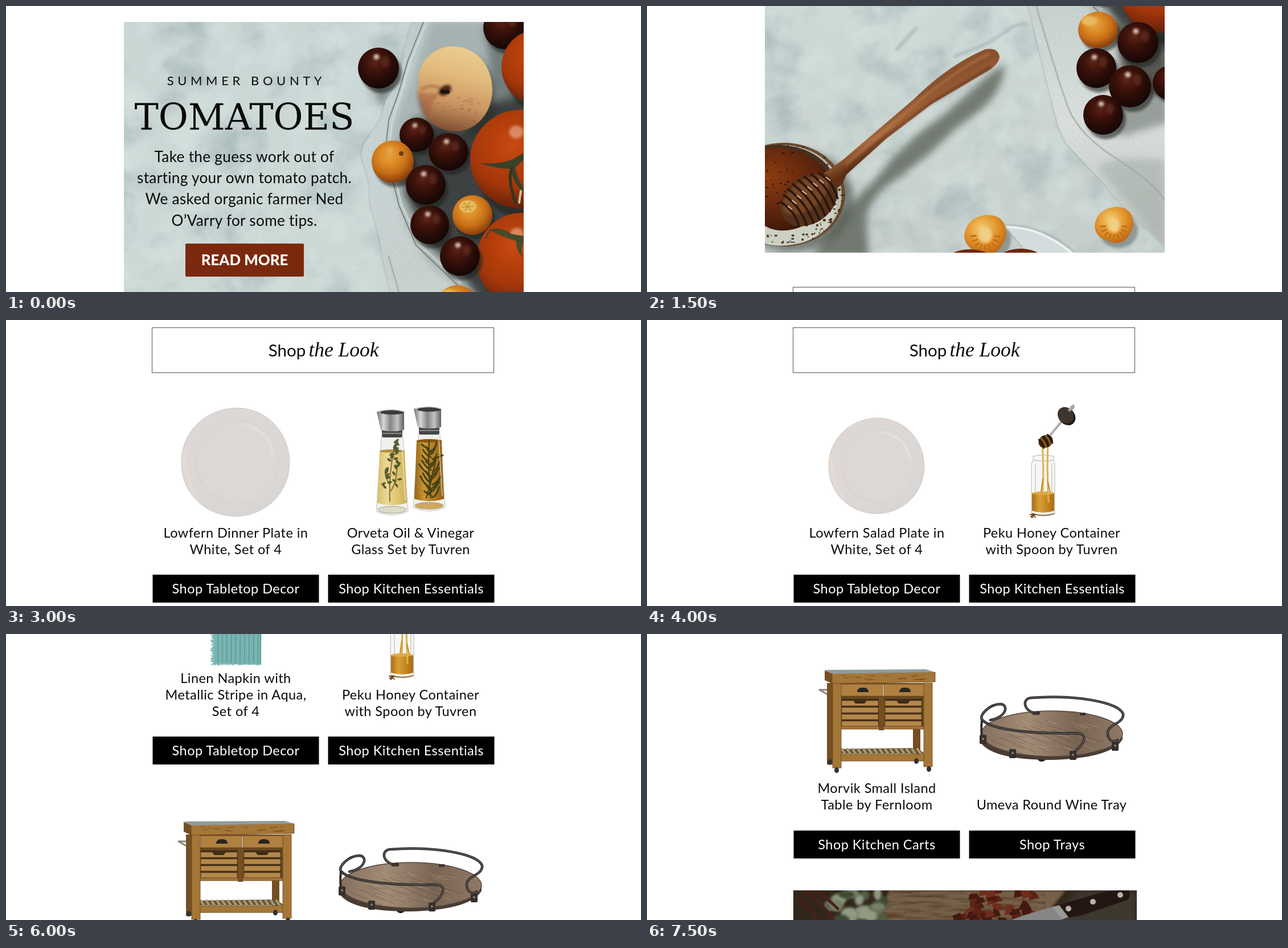
An HTML page that plays this animation: 1115x502 px, repeating every 8000 ms.

```html
<!DOCTYPE html>
<html lang="en">
<head>
<meta charset="utf-8">
<title>Summer Bounty</title>
<style>
  html, body { margin: 0; width: 100%; height: 100%; overflow: hidden; background: #fff; }
  svg { display: block; width: 100%; height: 100%; }
  text { font-family: Lato, sans-serif; text-anchor: middle; fill: #0b0b0b; }
  .label { font-size: 23.5px; letter-spacing: .45px; }
  .light { fill: #fff; }
  .body { font-size: 26.2px; letter-spacing: .3px; }
  .line { fill: none; stroke-linecap: round; stroke-linejoin: round; }
</style>
</head>
<body>
<svg id="stage" viewBox="0 0 1115 502"></svg>
<script>
const STEP = 500, STEPS = 16;

let seed = 7;
const rnd = (lo, hi) => {
  seed = (seed * 16807) % 2147483647;
  return lo + (hi - lo) * seed / 2147483647;
};
const times = (n, draw) => Array.from({ length: n }, (_, i) => draw(i)).join('');

const path = (d, fill, extra = '') => `<path d="${d}" fill="${fill}" ${extra}/>`;
const line = (d, color, width = 1, extra = '') =>
  `<path class="line" d="${d}" stroke="${color}" stroke-width="${width}" ${extra}/>`;
const oval = (x, y, rx, ry, fill, extra = '') =>
  `<ellipse cx="${x}" cy="${y}" rx="${rx}" ry="${ry}" fill="${fill}" ${extra}/>`;
const rect = (x, y, w, h, fill, extra = '') =>
  `<rect x="${x}" y="${y}" width="${w}" height="${h}" fill="${fill}" ${extra}/>`;
const text = (x, y, words, cls, extra = '') =>
  `<text x="${x}" y="${y}" class="${cls}" ${extra}>${words}</text>`;
const lines = (x, y, gap, cls, list) =>
  list.map((words, i) => text(x, y + i * gap, words, cls)).join('');
const at = (y, art) => `<g transform="translate(0 ${y})">${art}</g>`;
const turn = (deg, x, y) => `transform="rotate(${deg} ${x} ${y})"`;
const SOFT = 'filter="url(#soft)"', BLUR = 'filter="url(#blur)"';

const gradient = (id, stops, geometry) => {
  const tag = geometry ? 'linearGradient' : 'radialGradient';
  const box = geometry || 'cx=".42" cy=".35" r=".65"';
  return `<${tag} id="${id}" ${box}>` + stops.map((color, i) =>
    `<stop offset="${i / (stops.length - 1)}" stop-color="${color}"/>`).join('') + `</${tag}>`;
};
const DOWN = 'x1="0" y1="0" x2="0" y2="1"', ACROSS = 'x1="0" y1="0" x2="1" y2="0"';
const noise = (id, freq, rgb, gain, bias) => `
  <filter id="${id}" x="0" y="0" width="1" height="1" color-interpolation-filters="sRGB">
    <feTurbulence type="fractalNoise" baseFrequency="${freq}" numOctaves="5" seed="4"/>
    <feColorMatrix values="0 0 0 0 ${rgb[0]} 0 0 0 0 ${rgb[1]} 0 0 0 0 ${rgb[2]} ${gain} 0 0 0 ${bias}"/>
    <feComposite in2="SourceGraphic" operator="in"/>
  </filter>`;

const CLOTH = 'M712 28L700 76L690 130L667 166L657 200L628 243L624 262L637 308L640 350L654 400L667 470' +
  'L682 530L702 612L722 690L735 720L765 752L800 789L830 825L870 865L909 902V28Z';

const defs = `<defs>
  ${gradient('marble', ['#c9d6d4', '#cbd8d6', '#cdd9d6', '#cad5d2', '#c4cecb'], DOWN)}
  ${gradient('linen', ['#c2d0d1', '#ced9d9', '#ccd6d4', '#e0e5e2', '#c3c9c4'], DOWN)}
  ${gradient('dark', ['#5c2417', '#40130b', '#290c07', '#150706'])}
  ${gradient('red', ['#c84a12', '#b63f0b', '#a3370b', '#64200a'])}
  ${gradient('gold', ['#e2a23e', '#dd8c27', '#c56d17', '#8a3d0b'])}
  ${gradient('peach', ['#ebcd91', '#e2ba7c', '#cb9663', '#7d4c31'], 'x1=".6" y1="0" x2=".4" y2="1"')}
  ${gradient('pulp', ['#f3cf7b', '#e9ad48', '#dd8b24', '#bd6916'])}
  ${gradient('amber', ['#8c3d12', '#682a0e', '#401909'])}
  ${gradient('handle', ['#8a512d', '#a5673b', '#5e2f15'], 'x1=".42" y1=".4" x2=".56" y2=".62"')}
  ${gradient('steel', ['#6e6e6c', '#d8d8d6', '#858583', '#c4c4c2', '#5f5f5d'], ACROSS)}
  ${gradient('oil', ['#d8be6b', '#ead995', '#dfc670', '#cbae57'], ACROSS)}
  ${gradient('vinegar', ['#94641a', '#ca9634', '#b37c1f', '#8e5c12'], ACROSS)}
  ${gradient('honey', ['#a96d14', '#d89f38', '#c48522', '#ab6c12'], ACROSS)}
  ${gradient('china', ['#dcd6d5', '#ddd8d6', '#ddd8d5', '#d8d6d4'])}
  ${gradient('plank', ['#85705f', '#a28b76', '#796553', '#907966'], ACROSS)}
  <filter id="blur" x="-50%" y="-50%" width="200%" height="200%"><feGaussianBlur stdDeviation="2"/></filter>
  <filter id="soft" x="-50%" y="-50%" width="200%" height="200%"><feGaussianBlur stdDeviation="7"/></filter>
  ${noise('veins', '.011 .014', [.6, .67, .68], 1.6, -.78)}
  ${noise('clouds', '.02', [.86, .91, .9], 1.2, -.5)}
  ${noise('weave', '.5 .8', [.5, .56, .56], .7, -.28)}
  ${noise('grain', '.02 .16', [.25, .14, .05], 1.4, -.6)}
  <clipPath id="hero"><path d="M207 28H909V913H207Z"/></clipPath>
  <clipPath id="cloth"><path d="${CLOTH}"/></clipPath>
  <clipPath id="board"><path d="M257 1943H860V2020H257Z"/></clipPath>
</defs>`;

function fruit(kind, x, y, rx, ry = rx) {
  const shine = kind === 'red' ? .4 : kind === 'dark' ? .8 : .2;
  return oval(x + rx * .14, y + ry * .22, rx, ry, '#1d211c', `opacity=".6" ${BLUR}`) +
    oval(x, y, rx, ry, `url(#${kind})`) +
    oval(x - rx * .1, y - ry * .55, rx * .14, ry * .13, '#fff0e2', `opacity="${shine}" ${BLUR}`) +
    (kind === 'dark' ? oval(x + rx * .35, y - ry * .3, rx * .2, ry * .28, '#93523f', `opacity=".3" ${BLUR}`) : '');
}

function slice(x, y, r) {
  return oval(x + 8, y + 9, r, r * .9, '#59615a', `opacity=".5" ${BLUR}`) +
    path(`M${x - r} ${y}Q${x - r * .9} ${y - r * .8} ${x} ${y - r * .95}Q${x + r} ${y - r} ${x + r} ${y}` +
      `Q${x + r * .7} ${y + r} ${x} ${y + r * .9}Q${x - r} ${y + r * .7} ${x - r} ${y}Z`, 'url(#pulp)') +
    oval(x, y, r * .3, r * .36, '#f0cf85', BLUR) +
    times(9, i => {
      const a = .1 + i * .37, c = Math.cos(a), s = Math.sin(a);
      return line(`M${x + c * r * .45} ${y + s * r * .5}L${x + c * r * .68} ${y + s * r * .7}`, '#c27019', 3);
    });
}

function peach() {
  return oval(796, 160, 66, 74, '#1d211c', `opacity=".6" ${SOFT}`) +
    path('M724 135C720 105 748 70 785 71C828 71 855 108 854 150C852 190 825 220 788 220C750 218 732 195 733 172C722 160 721 150 724 135Z', 'url(#peach)') +
    path('M724 150Q740 158 765 150Q742 170 742 205Q720 180 724 150Z', '#99573a', `opacity=".45" ${BLUR}`) +
    line('M730 146Q750 134 767 148', '#8f5533', 4, `opacity=".6" ${BLUR}`) +
    times(50, () => oval(rnd(735, 830), rnd(160, 210), rnd(1, 4), rnd(1, 2.5), '#a8623f', 'opacity=".3"')) +
    oval(771, 148, 12, 8, '#4a2814', `${turn(-35, 771, 148)} ${BLUR}`) + line('M766 150L776 151', '#1b110b', 6);
}

function tomatoes() {
  return fruit('dark', 654, 109, 36) + fruit('dark', 876, 38, 38) + fruit('red', 932, 107, 62, 65) + peach() +
    fruit('dark', 721, 226, 30) + fruit('dark', 777, 256, 35, 33) + fruit('red', 905, 269, 90, 87) +
    fruit('gold', 679, 273, 37) + oval(694, 259, 4, 4, '#6b3b10') +
    fruit('dark', 737, 314, 35) + fruit('dark', 744, 384, 34) +
    fruit('gold', 819, 367, 35) + oval(811, 352, 15, 11, '#e5ba5f') +
    times(6, i => line(`M811 352l${11 * Math.cos(i)} ${8 * Math.sin(i)}`, '#c98b34', 1.5)) +
    fruit('red', 905, 445, 79, 82) + fruit('dark', 797, 439, 35) +
    path('M832 276Q867 278 888 270L909 258V270L894 284Q900 310 909 318V326Q888 310 887 286Q862 286 832 276Z', '#3b4029') +
    line('M888 285Q880 305 895 345', '#30371f', 5) + line('M904 325l-3 20', '#c8c4a3', 4) +
    path('M848 393Q870 387 887 400L909 404V414Q901 430 909 442Q895 430 896 413Q870 404 848 393Z', '#444a2c') +
    line('M868 393Q845 390 843 408', '#3d4428', 2) +
    fruit('gold', 792, 522, 35, 32) + oval(776, 506, 13, 9, '#e9bb60', BLUR) +
    fruit('dark', 862, 544, 36) + fruit('dark', 789, 589, 35) + fruit('dark', 918, 615, 30) +
    fruit('dark', 848, 621, 37) + fruit('dark', 801, 671, 35);
}

function linen() {
  return path(CLOTH, '#59635e', `opacity=".4" ${BLUR}`) + path(CLOTH, 'url(#linen)') +
    `<g clip-path="url(#cloth)">
      ${path('M745 28L715 120L680 205L670 270L705 390L745 455L800 500H920V28Z', '#6d7976', `opacity=".3" ${SOFT}`)}
      ${path('M850 170L920 150V560L830 515L800 470L745 420L700 330L695 240L720 195L800 225Z', '#1f1f1a', `opacity=".8" ${SOFT}`)}
      ${path('M840 35H920V150L870 175Q850 120 840 35Z', '#3b4340', `opacity=".5" ${SOFT}`)}
      ${path('M820 510L915 540V640L840 640Z', '#25241f', `opacity=".75" ${SOFT}`)}
      ${path('M820 650L915 640V685L830 710Z', '#555d58', `opacity=".5" ${SOFT}`)}
      ${line('M733 28L706 95L690 150L672 200L666 255L690 350L720 420L795 492', '#77837f', 2)}
      ${line('M739 28L711 95L695 150L678 205L672 255L695 350L728 420L798 485', '#e0e6e4', 3, 'opacity=".6"')}
      ${line('M672 440Q715 590 735 645Q750 700 820 745T909 820', '#9aa39e', 3, 'opacity=".6"')}
      ${path('M790 762Q830 740 909 752V902Z', '#a0a8a2', `opacity=".5" ${SOFT}`)}
      ${rect(620, 28, 290, 885, '#fff', 'filter="url(#weave)"')}
    </g>`;
}

function honeyBowl() {
  return path('M600 600L628 582Q628 622 590 660L540 697L490 745L430 790Q386 820 385 860L390 920H290L345 840L395 790L430 750L470 708L520 672Z',
      '#646b60', `opacity=".85" ${SOFT}`) +
    oval(258, 822, 105, 90, '#525a51', `opacity=".7" ${SOFT}`) +
    oval(240, 811, 108, 91, '#6a4a31') + oval(238, 812, 104, 88, '#b9bcac') +
    oval(230, 800, 102, 76, '#453022') + oval(227, 802, 97, 73, 'url(#amber)') +
    path('M207 866Q245 888 300 852L334 815Q334 878 270 896Q232 905 207 897Z', '#ccd0c2') +
    times(90, i => {
      const a = rnd(-1.7, 2), d = rnd(.8, .99);
      return oval(240 + 107 * d * Math.cos(a), 811 + 91 * d * Math.sin(a), rnd(.8, 2.8), rnd(.8, 2.2), '#49301e');
    }) +
    times(26, () => oval(rnd(208, 260), rnd(735, 830), rnd(.8, 2.4), rnd(.8, 2), '#2b1209')) +
    `<g ${turn(-37, 286, 819)}>` +
      oval(284, 819, 55, 41, '#54301a') + oval(284, 809, 47, 25, '#85502b', `opacity=".7" ${BLUR}`) +
      times(8, i => {
        const x = 242 + i * 12, h = 39 * Math.sqrt(1 - ((x - 284) / 57) ** 2);
        return line(`M${x} ${819 - h}Q${x + 11} 819 ${x} ${819 + h}`, '#2c170d', 4) +
          line(`M${x + 6} ${819 - h * .5}l2 8`, '#f0d0b0', 2.2, 'opacity=".8"');
      }) + '</g>' +
    path('M310 774Q322 766 345 749L468 644Q530 583 594 556Q617 552 619 570Q617 584 595 596L500 652L420 713L350 776Q345 792 334 800Q327 780 310 774Z', 'url(#handle)') +
    line('M350 757L470 653Q540 594 600 564', '#c58c5c', 4, `opacity=".5" ${BLUR}`) +
    line('M346 774L420 708L500 649L602 588', '#4a2513', 4, `opacity=".6" ${BLUR}`);
}

function heroPhoto() {
  return `<g clip-path="url(#hero)">
    ${rect(207, 28, 702, 885, 'url(#marble)')}
    ${rect(207, 28, 702, 885, '#fff', 'filter="url(#veins)"')}
    ${rect(207, 28, 702, 885, '#fff', 'filter="url(#clouds)"')}
    ${line('M438 556l34-36', '#8d9c9e', 6, `opacity=".45" ${BLUR}`)}
    ${line('M540 568Q600 548 625 528T668 512', '#96a5a6', 6, `opacity=".5" ${BLUR}`)}
    ${path('M640 130L690 120L660 180Z', '#525e5a', `opacity=".6" ${SOFT}`)}
    ${linen()}${tomatoes()}${honeyBowl()}
    ${path('M628 866Q690 860 752 913H668Z', '#6a736e', `opacity=".5" ${BLUR}`)}
    ${path('M626 866Q690 862 753 915H668Q652 890 626 866Z', '#d4dbdc')}
    ${line('M632 868Q690 868 745 913', '#f1f4f4', 3)}
    ${slice(594, 882, 37)}${slice(820, 865, 34)}
    ${oval(567, 922, 36, 15, '#702711')}${oval(656, 922, 36, 16, '#702711')}
  </g>`;
}

function heroCopy() {
  return text(422, 138.5, 'SUMMER BOUNTY', '', 'font-size="22" letter-spacing="6.6"') +
    text(418.5, 217, 'TOMATOES', '', 'style="font:63.5px DejaVu Serif,serif"') +
    lines(418.5, 274, 37.2, 'body', ['Take the guess work out of', 'starting your own tomato patch.',
      'We asked organic farmer Ned', 'O’Varry for some tips.']) +
    rect(315, 417, 208, 58, '#7b290e', 'rx="2"') +
    text(419, 455, 'READ MORE', 'light', 'font-size="25.8" font-weight="800"');
}

const button = (x, y, words) => rect(x, y, 292, 49, '#000') + text(x + 146, y + 33, words, 'label light');

function plate(cx, cy, r) {
  return `<g transform="translate(${cx} ${cy}) scale(${r / 95})">` +
    path('M0-95C55-96 94-52 95 0C95 54 53 94 2 95C-50 96-95 56-95 2C-96-50-56-93 0-95Z', 'url(#china)', 'stroke="#c4bfbe" stroke-width=".8"') +
    oval(2, 0, 72, 74, '#ddd7d6', 'stroke="#d6d0cf" stroke-width="1"') +
    line('M10-66Q58-60 66-14', '#eae6d9', 3, BLUR) + line('M-90-20Q-92 30-65 65', '#e9dbd2', 5, BLUR) +
    line('M-66 20Q-50 65-5 68', '#d3d0ce', 2, BLUR) + '</g>';
}

function napkin() {
  return path('M364 1106L449 1109L448 1281L364 1279Z', '#75b6b3') +
    times(58, i => line(`M366 ${1107 + i * 3}l${-rnd(3, 6)} ${rnd(-2, 3)}`, '#7bbab7', 2.5)) +
    times(28, i => line(`M${365 + i * 3} 1278l${rnd(-1, 1)} ${rnd(1, 3)}`, '#75b6b3', 2.5)) +
    times(10, i => line(`M${373 + i * 7.8} 1108l-1 169`, '#737f83', 1.1, 'stroke-dasharray="5 .8"')) +
    line('M447 1110V1279', '#5ca09e', 2);
}

function bottle(x, top, base, level, liquid, herb) {
  const w = 28, y0 = top + 48;
  return path(`M${x - 19} ${y0}H${x + 19}L${x + w} ${base - 7}Q${x} ${base + 6} ${x - w} ${base - 7}Z`, '#f0f0ec', 'stroke="#c3c3bd"') +
    path(`M${x - 22} ${level}H${x + 22}L${x + w - 2} ${base - 22}Q${x} ${base - 14} ${x - w + 2} ${base - 22}Z`, `url(#${liquid})`) +
    oval(x, level, 22, 3, liquid === 'oil' ? '#b5913d' : '#865713') +
    oval(x, base - 10, w - 3, 6, liquid === 'oil' ? '#dedbc9' : '#d0a75c', 'stroke="#a7a08e"') + herb +
    line(`M${x + 17} ${y0 + 9}L${x + 23} ${base - 28}`, '#fff', 2, 'opacity=".5"') +
    rect(x - 18, top + 34, 36, 14, '#444644', 'rx="3"') + line(`M${x - 17} ${top + 41}h34`, '#a4a6a1', 1.5) +
    path(`M${x - 27} ${top + 3}L${x + 21} ${top + 2}L${x + 21} ${top + 35}Q${x} ${top + 40} ${x - 20} ${top + 35}Z`, 'url(#steel)') +
    oval(x, top + 4, 21, 4, '#3c3c3a') + line(`M${x - 27} ${top + 3}Q${x} ${top - 4} ${x + 21} ${top + 3}`, '#c4c4c2', 1.5);
}

function cruets() {
  const thyme = line('M674 1278Q672 1220 685 1171 M676 1260Q688 1240 686 1215 M674 1250Q664 1232 666 1225', '#8a6032', 1.8) +
    times(32, i => {
      const y = 1172 + i * 2.6, x = 685 - i * .3 + rnd(-1, 1) * (5 + i * .35);
      return oval(x, y, 4.2, 2, '#555c32', turn(rnd(-60, 60), x, y));
    });
  const rosemary = line('M746 1272Q740 1215 743 1172 M738 1272Q751 1230 756 1195', '#53411a', 2.4) +
    times(24, i => {
      const y = 1178 + i * 3.7, side = i % 2 ? 1 : -1;
      return line(`M${743 + (i % 3) * 3} ${y + 8}q${side * 8} -3 ${side * rnd(8, 18)} ${-rnd(6, 20)}`, '#454218', 3);
    });
  return bottle(678, 1118, 1303, 1190, 'oil', thyme) + bottle(743, 1113, 1296, 1172, 'vinegar', rosemary);
}

function honeyJar() {
  return line('M749 63L707 114', '#8e8e8c', 4) + line('M748 63L707 113', '#dededc', 1.5) +
    oval(737, 80, 14, 17, '#221a17', turn(-42, 737, 80)) + oval(735, 78, 13, 15, '#40342f', turn(-42, 735, 78)) +
    line('M742 69L748 62', '#a6a6a4', 5) +
    path('M678 150Q696 146 714 150V157L716 164V251Q696 259 675 251V164L678 157Z', '#f7f7f5', 'stroke="#b5b5b3"') +
    line('M678 157Q696 160 714 157 M682 164V245 M711 164V245', '#d5d5d2', 2) +
    path('M676 215H715V246Q696 252 676 246Z', 'url(#honey)') + oval(695.5, 215, 19.5, 3, '#dda94b') +
    line('M676 251Q696 257 715 251', '#957544', 2) +
    line('M694 130Q697 170 695 212 M704 130Q702 170 705 230', '#dab24f', 3) +
    line('M695 190L692 212 M704 195L708 213', '#c78a23', 2) +
    `<g ${turn(-30, 700, 124)}>${oval(700, 124, 13, 11, '#492b10')}` +
    times(5, i => line(`M${691 + i * 4.5} 115q3 9 0 18`, i % 2 ? '#a0702a' : '#1b1009', 2)) + '</g>' +
    line('M674 256l8-4 M673 252l9 5 M676 258l2-7', '#5b3c12', 2);
}

function kitchenCart() {
  const wood = '#a47637', dark = '#754f22', edge = 'stroke="#67451e" stroke-width=".8"';
  const crate = x => rect(x, 114, 65, 49, '#3d2a17') +
    times(4, i => rect(x, 117 + i * 12, 64, 9, '#b4884b', edge)) + path(`M${x + 20} 117h24l-4 5h-16Z`, '#3d2a17');
  const drawer = x => rect(x, 88, 72, 21, '#b08040', edge) + path(`M${x + 27} 102Q${x + 27} 94 ${x + 37} 94T${x + 47} 102Z`, '#272522');
  return line('M303 98L315 105H328 M303 98H318', '#88857e', 3) +
    rect(316, 86, 11, 143, dark) + rect(467, 165, 13, 55, dark) +
    rect(341, 109, 146, 55, '#68471f') + crate(342) + crate(418) +
    rect(326, 162, 162, 5, wood, edge) + rect(407, 110, 9, 59, dark) +
    rect(330, 86, 165, 3, dark) + drawer(342) + drawer(416) +
    path('M329 202L474 200L488 210H340Z', '#685536') +
    times(15, i => line(`M${342 + i * 9.5} 202l6 9`, '#a99b74', 4)) +
    rect(340, 211, 147, 12, wood, edge) +
    rect(326, 86, 15, 149, wood, edge) + rect(486, 86, 15, 147, wood, edge) +
    path('M312 64L325 69V87L312 81Z', dark) + path('M325 69L506 67V84L325 87Z', wood, edge) +
    path('M312 63L490 62L506 67L325 70Z', '#929b9c') +
    times(22, () => line(`M${rnd(328, 490)} ${rnd(72, 82)}h${rnd(4, 14)}`, '#744e20', .8)) +
    [[333, 239], [495, 237], [321, 225], [473, 223]].map(([x, y]) => oval(x, y, 4, 5, '#34312f')).join('');
}

function tray() {
  const rail = d => line(d, '#302c2a', 4.5) + line(d, '#6f6762', 1.2);
  const bracket = (x, y) => rect(x - 6, y - 7, 12, 16, '#36302d', 'rx="2"') + oval(x, y, 2, 2, '#8a7e76');
  return oval(693, 219, 7, 5, '#221d1b') +
    path('M587 178V192Q610 221 711 221Q815 218 835 185V172Z', '#4a3c33') +
    oval(711, 175, 124, 40, 'url(#plank)', 'stroke="#54463b" stroke-width="1.5"') +
    times(8, i => line(`M${605 + i * 14} ${187 - i * 6 + (i > 4 ? (i - 4) * 5 : 0)}L${660 + i * 20} ${210 - i * 3}`, '#665345', 1.2, 'opacity=".55"')) +
    times(45, () => {
      const x = rnd(630, 780), y = rnd(150, 202);
      return line(`M${x} ${y}l${rnd(8, 28)} ${rnd(3, 9)}`, rnd(0, 1) > .5 ? '#c1a993' : '#665245', 1, 'opacity=".45"');
    }) +
    rail('M688 139C662 140 656 113 675 112C748 106 828 119 836 140C838 157 812 157 809 172C808 186 819 192 826 186') +
    rail('M603 151C632 146 635 124 621 123C602 123 583 142 588 150C602 168 675 176 754 174C774 175 771 191 749 208') +
    line('M588 152Q586 170 589 187', '#302c2a', 4) +
    bracket(642, 209) + bracket(748, 212) + bracket(822, 196) + bracket(590, 184) +
    rect(677, 136, 12, 6, '#3c3430') + rect(760, 138, 10, 5, '#3c3430');
}

function cuttingBoard() {
  return `<g clip-path="url(#board)">
    ${rect(257, 1943, 603, 77, '#32261b')}
    ${path('M425 1943H735L680 2010H400Z', '#756049', BLUR)}
    ${rect(400, 1943, 300, 77, '#fff', 'filter="url(#grain)"')}
    ${path('M757 1943H860V2010H700Z', '#3e372d', SOFT)}
    ${times(45, () => {
      const x = rnd(535, 690), y = rnd(1942, 1998) - (x - 535) * .05;
      return path(`M${x} ${y}l${rnd(6, 16)} ${rnd(-8, 5)}l${rnd(2, 9)} ${rnd(8, 15)}l-18 4Z`, ['#451911', '#5b2216', '#6f2c1c'][Math.floor(rnd(0, 3))]);
    })}
    ${times(26, () => oval(rnd(320, 415), rnd(1942, 1998), rnd(6, 16), rnd(4, 11), ['#525b43', '#768066', '#929a83', '#3f4932'][Math.floor(rnd(0, 4))], BLUR))}
    ${line('M275 1943Q310 1965 330 2000 M262 1960Q290 1975 300 2000 M300 1943L335 1975', '#482018', 5)}
    ${path('M625 2000Q665 1985 714 1971L730 1990L720 2010H625Z', '#858685')}
    ${path('M711 1972L800 1946L843 1941Q853 1949 843 1960L760 1988L729 1992Z', '#241713')}
    ${path('M711 1972L724 1969L740 1990L729 1994Z', '#989894')}
    ${[[740, 1975], [783, 1963], [831, 1951]].map(([x, y]) => oval(x, y, 5, 5, '#b6b3ac')).join('')}
  </g>`;
}

const title = (x, ...words) => lines(x, 1371 - 29.2 * (words.length - 1), 29.2, 'label', words);
const products = {
  plate: plate(403, 1209.5, 95) + title(403.5, 'Lowfern Dinner Plate in', 'White, Set of 4'),
  salad: plate(403, 1216, 84) + title(403.5, 'Lowfern Salad Plate in', 'White, Set of 4'),
  napkin: napkin() + title(403.5, 'Linen Napkin with', 'Metallic Stripe in Aqua,', 'Set of 4'),
  cruets: cruets() + title(710.5, 'Orveta Oil &amp; Vinegar', 'Glass Set by Tuvren'),
  jar: at(1049, honeyJar()) + title(710.5, 'Peku Honey Container', 'with Spoon by Tuvren'),
};

const stage = document.getElementById('stage');
stage.innerHTML = defs + `<g id="page">
  ${heroPhoto()}${heroCopy()}
  ${rect(256.5, 973.5, 600, 79, 'none', 'stroke="#555"')}
  ${text(493.5, 1023.5, 'Shop', '', 'font-size="29.5"')}
  ${text(593, 1023.5, 'the Look', '', 'style="font:italic 35.5px Liberation Serif,serif"')}
  ${Object.entries(products).map(([id, art]) => `<g id="${id}">${art}</g>`).join('')}
  ${button(257.5, 1407, 'Shop Tabletop Decor')}${button(565.5, 1407, 'Shop Kitchen Essentials')}
  ${at(1493, kitchenCart() + tray())}
  ${lines(403.5, 1771.8, 29.2, 'label', ['Morvik Small Island', 'Table by Fernloom'])}
  ${text(710.5, 1801, 'Umeva Round Wine Tray', 'label')}
  ${button(257.5, 1838, 'Shop Kitchen Carts')}${button(565.5, 1838, 'Shop Trays')}
  ${cuttingBoard()}
</g>`;

const page = document.getElementById('page');
let shown = -1;

function frame(now) {
  const step = Math.floor(now / STEP) % STEPS;
  if (step !== shown) {
    shown = step;
    // Scroll to the products, pause while they change, then scroll on more slowly.
    const scroll = Math.min(step, 6) * 160 + Math.round(Math.max(step - 9, 0) * 88.9);
    page.setAttribute('transform', `translate(0 ${-scroll})`);
    const visible = [step < 7 ? 'plate' : step < 9 ? 'salad' : 'napkin', step < 8 ? 'cruets' : 'jar'];
    for (const id in products)
      document.getElementById(id).style.display = visible.includes(id) ? '' : 'none';
  }
  requestAnimationFrame(() => frame(performance.now() - start));
}
const start = performance.now();
frame(0);
</script>
</body>
</html>
```
